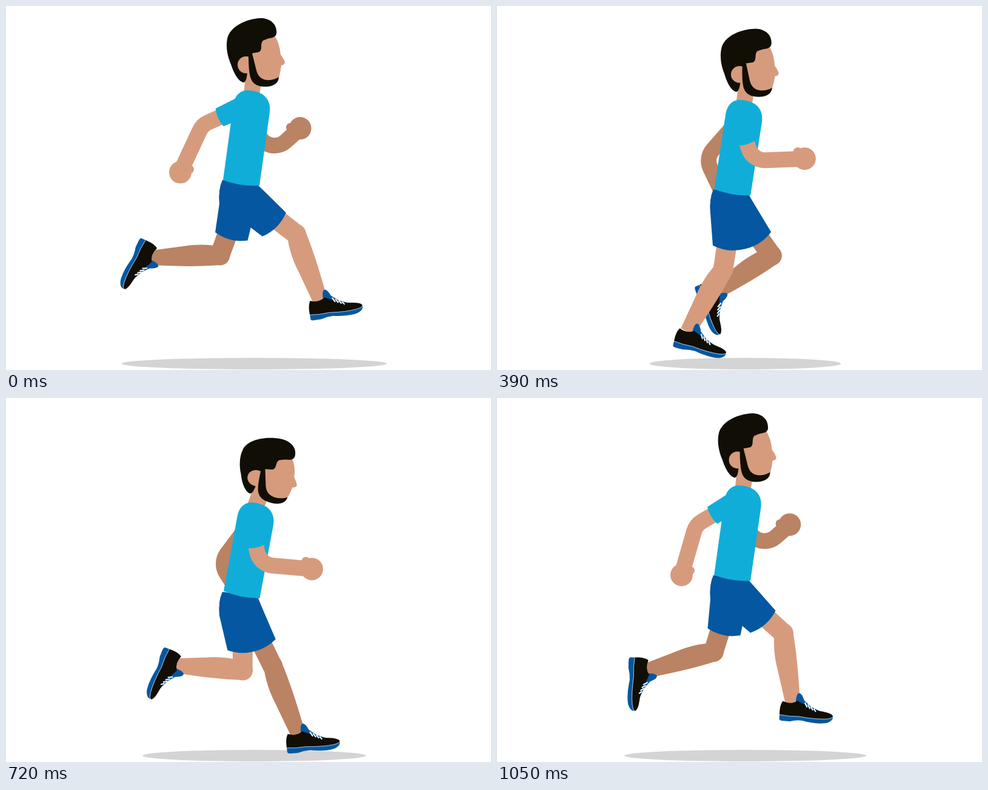
An HTML page with a canvas that plays this animation: 800x600 px, repeating every 1080 ms.

```html
<!DOCTYPE html>
<html lang="en">
<head>
<meta charset="utf-8">
<title>Runner</title>
<style>
  html, body { margin: 0; width: 100%; height: 100%; overflow: hidden; background: #fff; }
  canvas { display: block; }
</style>
</head>
<body>
<canvas id="stage" width="800" height="600"></canvas>
<script>
const ctx = document.getElementById('stage').getContext('2d');
const SKIN = '#d69b7d', SKIN_FAR = '#ba8363', SHIRT = '#11add9';
const BLUE = '#0457a0', DARK = '#110e06', SHADOW = '#d4d4d4';
const STEP = 30, FRAMES = 36, HALF = 18, STRIDE = 2 * HALF, LANDING = 5.5;

const rad = d => d * Math.PI / 180;
const clamp = s => Math.min(1, Math.max(0, s));
const smooth = s => (1 - Math.cos(Math.PI * clamp(s))) / 2;
const wrap = (t, n) => ((t % n) + n) % n;

// Swings from a to b in one step and back in the next. soft: 0 is linear,
// 1 rests at both ends; lead hurries the first step.
function swing(p, a, b, soft, lead = 0) {
  const t = wrap(p, STRIDE), s = (t % HALF) / HALF;
  const e = s - soft * Math.sin(2 * Math.PI * s) / (2 * Math.PI);
  return a + (b - a) * (t < HALF ? e + lead * Math.sin(Math.PI * s) : 1 - e);
}

// Monotone cubic through [phase, ...values] key poses, repeating each stride.
function cycle(keys) {
  const n = keys.length;
  const time = i => keys[wrap(i, n)][0] + STRIDE * Math.floor(i / n);
  const value = (i, c) => keys[wrap(i, n)][c];
  const slope = (i, c) => (value(i + 1, c) - value(i, c)) / (time(i + 1) - time(i));
  const tangent = (i, c) => {
    const a = slope(i - 1, c), b = slope(i, c);
    return a * b <= 0 ? 0 : 2 * a * b / (a + b);
  };
  return (phase, c) => {
    const t = wrap(phase, STRIDE);
    let i = n - 1;
    while (keys[i][0] > t) i--;
    const h = time(i + 1) - time(i), s = (t - time(i)) / h, r = 1 - s;
    return value(i, c) * r * r * (1 + 2 * s) + value(i + 1, c) * s * s * (3 - 2 * s) +
      h * s * r * (tangent(i, c) * r - tangent(i + 1, c) * s);
  };
}
// phase, shin angle, ankle bend
const lowerLeg = cycle([
  [0, 20, 14], [5, 21.5, 18.5], [9.65, 0, 0], [13, -30, -13], [18, -88, 30],
  [21, -96, 23], [27.65, -86.5, 17.5], [31, -57, 15], [35, 14.6, 14]
]);
function legPose(p) {
  const shin = lowerLeg(p, 1);
  return { thigh: swing(p, 52.5, -19.8, 0.3, 0.1), shin, foot: lowerLeg(p, 2) - shin };
}

// How far the body has sunk: 0 in flight, 1 after landing.
const sink = t => t < LANDING
  ? smooth(t / LANDING)
  : 1 - ((t - LANDING) / (HALF - LANDING)) ** 1.25;
const shadowWidth = t => 438 - 122 * Math.min(smooth((t - 2) / 7), clamp((HALF - t) / 5));

// Limb angles are measured from straight down, forward positive.
const aim = (p, a, len) => [p[0] + Math.sin(rad(a)) * len, p[1] + Math.cos(rad(a)) * len];
const add = (a, b) => [a[0] + b[0], a[1] + b[1]];
function turn([x, y], d) {
  const c = Math.cos(rad(d)), s = Math.sin(rad(d));
  return [x * c - y * s, x * s + y * c];
}

function fill(path, color) {
  ctx.fillStyle = color;
  ctx.fill(new Path2D(path));
}
function oval([x, y], rx, ry, color) {
  ctx.fillStyle = color;
  ctx.beginPath();
  ctx.ellipse(x, y, rx, ry, 0, 0, 2 * Math.PI);
  ctx.fill();
}
const dot = (p, r, color) => oval(p, r, r, color);
function placed([x, y], angle, draw) {
  ctx.save();
  ctx.translate(x, y);
  ctx.rotate(rad(angle));
  draw();
  ctx.restore();
}

function shoe() {
  fill('M7 8Q5 -8 10 -11Q15 -11 20 0L32 9L48 15L30 22Z', BLUE);
  fill('M-18 26L-17.500 35Q-17 37.500 -12 37.500L0 37Q10 33.500 20 33.500C36 36 55 36 63 32Q71 28 70 22Z', BLUE);
  fill('M-15 5C-19 12 -18.500 20 -18 27.500Q-2 29 14 27Q42 29 60 26Q72 23 69.500 20Q66 16 52 15Q40 14 33 12L22 7L9 2Q-1 10 -15 5Z', DARK);
  ctx.strokeStyle = '#cfd6df';
  ctx.lineWidth = 0.8;
  ctx.stroke(new Path2D('M-18 27.900Q-2 29.400 14 27.400Q42 29.400 60 26.500Q69 24.500 70 22'));
  ctx.strokeStyle = '#fff';
  ctx.lineWidth = 2;
  for (let i = 0; i < 4; i++) {
    ctx.beginPath();
    ctx.moveTo(21.5 + 5.2 * i, 3.5 + 2.8 * i);
    ctx.lineTo(26 + 5 * i, 11 + 1.9 * i);
    ctx.stroke();
  }
}

function leg(hip, { thigh, shin, foot }, color) {
  const bend = thigh - shin;
  const upper = 113 - 0.05 * bend, lower = 114 - 0.11 * bend, end = lower + 7;
  const knee = aim(hip, thigh, upper), ankle = aim(knee, shin, lower);
  placed(hip, -thigh, () => fill(`M-17 0L-16.500 ${upper}L16 ${upper}L17 0Z`, color));
  dot(knee, 16.5, color);
  placed(knee, -shin, () =>
    fill(`M-15 0C-19 18 -20 38 -17.500 58L-12 ${end}L12 ${end}Q18 45 16 0Z`, color));
  placed(ankle, foot, shoe);
}

function shortsLeg(hip, thigh) {
  const a = 0.82 * thigh + 2;
  const at = (along, across) => add(aim([0, 0], a, along), aim([0, 0], a + 90, across)).join(' ');
  placed(hip, 0, () => fill(
    `M-33 -21Q-40 -6 -38 18L${at(74, -27.6)}Q${at(85, 0)} ${at(74, 27.6)}Q${at(19, 27.6)} 25 -13Z`, BLUE));
}

function torso() {
  fill('M-32 -21L-15 -145C-13 -160 -4 -169 8 -169Q19 -169 28 -165C41 -160 47 -147 45 -133L28 -12Q-2 -10 -32 -21Z', SHIRT);
}

function head(squash) {
  ctx.scale(1 + 0.06 * squash, 1 - 0.06 * squash);
  ctx.translate(-405, -141);
  fill('M396 105L392 146L418 148L421 125Z', SKIN);
  fill('M400 75L422 54L443 49Q451 60 453 80Q457 85 460 92Q460 97 454 98Q453 108 450 119L430 128L406 120Z', SKIN);
  fill('M424 57Q432 53 440 52Q448 49 446 40C445 28 434 20 420 20C396 21 369 34 365 54' +
    'C362 68 366 85 371 96C376 112 384 125 392 126Q397 125 398 108L404 80L406 78L417 76' +
    'Q421 74 421 68Q421 59 424 57Z', DARK);
  dot([396, 97], 14, SKIN);
  fill('M400 78C400 98 401 112 404 120C408 130 417 133 428 133C441 133 450 127 450 117' +
    'Q441 123 430 122C419 121 415 113 413 106L406 78Z', DARK);
}

function arm(shoulder, upper, fore, lens, color) {
  const elbow = aim(shoulder, upper, lens[0]), fist = aim(elbow, fore, lens[1]);
  ctx.strokeStyle = color;
  ctx.lineWidth = 26;
  ctx.beginPath();
  ctx.moveTo(...shoulder);
  ctx.arcTo(...elbow, ...fist, 28);
  ctx.lineTo(...fist);
  ctx.stroke();
  dot(fist, 18.5, color);
  dot(add(aim(fist, fore, -11), aim([0, 0], fore + 90, 12)), 7, color);
}

function sleeve(shoulder, angle) {
  placed(shoulder, -angle, () =>
    fill('M-18 0Q-17 25 -16 48Q0 53 16 48Q17 25 18 0A18 18 0 0 0 -18 0Z', SHIRT));
}

function draw(frame) {
  // The second step is slightly slower than the first.
  const p = frame <= HALF ? frame : HALF + (frame - HALF) * 0.965;
  const t = p % HALF, low = sink(t);
  const hip = [390, 308 + 33 * low];
  const lean = 2.6 * low ** 1.5, nod = low ** 2.5;
  const onTorso = (x, y) => add(hip, turn([x, y], lean));
  const near = legPose(p), far = legPose(p + HALF);
  const shoulder = onTorso(6, -144), upperArm = swing(p, -66, 41, 0.35);

  ctx.fillStyle = '#fff';
  ctx.fillRect(0, 0, 800, 600);
  oval([409.5, 589.5], shadowWidth(t) / 2, 9.5, SHADOW);

  arm(onTorso(8, -137), swing(p, 24.4, -54.5, 0.7), swing(p, 132, 11, 1), [85, 70], SKIN_FAR);
  leg(hip, far, SKIN_FAR);
  leg(hip, near, SKIN);
  shortsLeg(hip, far.thigh);
  shortsLeg(hip, near.thigh);
  placed(onTorso(15, -167), 14 * nod, () => head(nod));
  placed(hip, lean, torso);
  arm(shoulder, upperArm, swing(p, -25, 126, 0.35), [79, 86], SKIN);
  sleeve(shoulder, upperArm);
}

const start = performance.now();
function tick() {
  const t = Math.max(0, performance.now() - start);
  draw(Math.floor(t / STEP) % FRAMES);
  requestAnimationFrame(tick);
}
tick();
</script>
</body>
</html>
```
